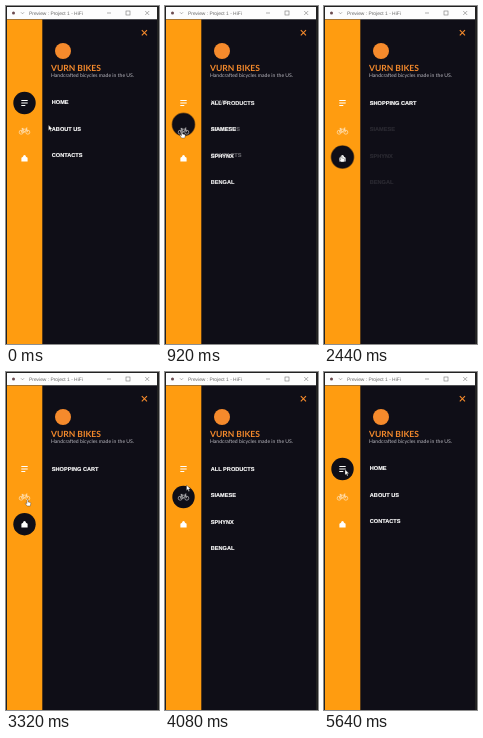
Recreate the animation shown at these times as an HTML page. Size 153 by 338 pixels, loop 5.68 s.

```html
<!DOCTYPE html>
<html lang="en">
<head>
<meta charset="utf-8">
<title>Menu prototype</title>
<style>
  html, body { margin: 0; width: 100%; height: 100%; overflow: hidden; background: #222; }
  svg { display: block; width: 100%; height: 100%; }
  text { text-rendering: geometricPrecision; }
  .bar { font: 4.9px "Liberation Sans", sans-serif; fill: #666; }
  .brand { font: bold 8.5px Lato, sans-serif; fill: #f58a2c; }
  .tag { font: 5.08px Lato, sans-serif; fill: #bbbac2; }
  .page { font: bold 5.6px "Liberation Sans", sans-serif; fill: #fff; stroke: #fff; stroke-width: .15; }
  .line { fill: none; stroke: #fff; stroke-width: .5; }
</style>
</head>
<body>
<svg viewBox="0 0 153 338">
  <rect width="153" height="338" fill="#222"/>
  <rect x="1" y="1" width="150" height="12.5" fill="#fdfdfd"/>
  <circle cx="7.5" cy="7" r="1.5" fill="#6b4a4e"/>
  <g fill="none" stroke="#777" stroke-width=".6">
    <path d="M15 6.3l1.5 1.5 1.5-1.5M101 7h4M139.2 5l4 4m0-4l-4 4"/>
    <rect x="120" y="5" width="4" height="4"/>
  </g>
  <text class="bar" x="23" y="8.8">Preview : Project 1 - HiFi</text>

  <rect x="1" y="13.5" width="150" height="324.5" fill="#0f0e17"/>
  <rect x="1" y="13.5" width="35.3" height="324.5" fill="#ff9c10"/>
  <path d="M135.8 24.2l5.2 5.2m0-5.2l-5.2 5.2" stroke="#f58a2c" stroke-width="1.1"/>
  <circle cx="57" cy="45" r="8" fill="#f58a2c"/>
  <text class="brand" x="45" y="65">VURN BIKES</text>
  <text class="tag" x="45" y="71">Handcrafted bicycles made in the US.</text>
  <g id="pages"></g>

  <circle id="spot" cx="18.5" r="11.2" fill="#0f0e17" stroke="#0f0e17" stroke-width="1.4"/>
  <path transform="translate(18.5 97)" d="M-3.2-2.5h6.4M-3.2 0h6.4M-3.2 2.5h4" stroke="#fff" stroke-width="1.1"/>
  <g class="line" transform="translate(18.5 125)">
    <circle cx="-3.3" cy="1.2" r="2"/>
    <circle cx="3.3" cy="1.2" r="2"/>
    <path d="M-3.3 1.2L-1.8-1.8H2L0 1.2H-3.3M0 1.2L-2-2.6M-2.9-2.6h1.8M3.3 1.2L1.6-3H3"/>
  </g>
  <path transform="translate(18.5 152.3)" d="M-3.1 3.3V-.6L-1.5-1.6Q-1.3-3.3 0-3.3T1.5-1.6L3.1-.6V3.3Z" fill="#fff"/>

  <g id="cursor" fill="#fff" stroke="#222" stroke-width=".35">
    <path id="arrow" d="M0 0v5.6l1.3-1.2.9 2 .9-.4-.9-1.9h1.8z"/>
    <path id="hand" d="M-.6.5q.6-1 1.2 0v2l2.2.5q.6.2.5.9l-.5 2.6h-3.2l-1.7-2.4q0-.8.8-.5l.7.6z"/>
  </g>
</svg>
<script>
const LOOP = 5680, FADE = 580;
const $ = id => document.getElementById(id);
const rows = [97, 125, 152.2];
const menus = [
  { top: 98.1, items: ["HOME", "ABOUT US", "CONTACTS"] },
  { top: 98.9, items: ["ALL PRODUCTS", "SIAMESE", "SPHYNX", "BENGAL"] },
  { top: 98.9, items: ["SHOPPING CART"] }
];
// start time, page opened
const clicks = [[620, 1], [1980, 2], [3500, 1], [4840, 0]];
// time, x, y of the pointer tip
const path = [
  [0, 42.5, 119], [40, 42.5, 119], [560, 17, 125.5], [1220, 17, 125.5],
  [1800, 17.8, 150], [2000, 17.3, 149.5], [2820, 17.3, 149.5],
  [3320, 21.5, 127.5], [3800, 21.5, 127.5], [4080, 21.5, 113],
  [4640, 21, 97.5], [LOOP, 21, 97.5]
];

$("pages").innerHTML = menus.map(m => `<g class="page">${
  m.items.map((s, i) => `<text x="45.8" y="${m.top + i * 26.5}">${s}</text>`).join("")}</g>`).join("");
const pages = [...$("pages").children];
const mix = (a, b, k) => a + (b - a) * k;

function pointer(t) {
  const i = path.findIndex(p => p[0] > t);
  const [t0, x0, y0] = path[i - 1], [t1, x1, y1] = path[i];
  const k = (t - t0) / (t1 - t0), e = k * k * (3 - 2 * k);
  return [mix(x0, x1, e), mix(y0, y1, e)];
}

function draw(t) {
  let from = 0, to = 0, left = 0;
  for (const [start, page] of clicks) {
    if (t < start) break;
    from = to;
    to = page;
    left = (1 - Math.min(1, (t - start) / FADE)) ** 2;
  }
  pages.forEach((g, i) => g.setAttribute("opacity",
    i === to ? 1 - left ** 2 : i === from ? left ** .7 : 0));
  $("spot").setAttribute("cy", mix(rows[to], rows[from], left));
  // soft rim while the marker moves
  $("spot").setAttribute("stroke-opacity", left ? .5 : 0);

  const [x, y] = pointer(t);
  const over = rows.findIndex(r => Math.hypot(x - 18.5, y - r) < 11);
  const hand = over >= 0 && over !== (left ? from : to);
  $("cursor").setAttribute("transform", `translate(${x} ${y})`);
  $("hand").style.display = hand ? "" : "none";
  $("arrow").style.display = hand ? "none" : "";
}

const begin = performance.now();
function tick() {
  draw((performance.now() - begin) % LOOP);
  requestAnimationFrame(tick);
}
tick();
</script>
</body>
</html>
```
